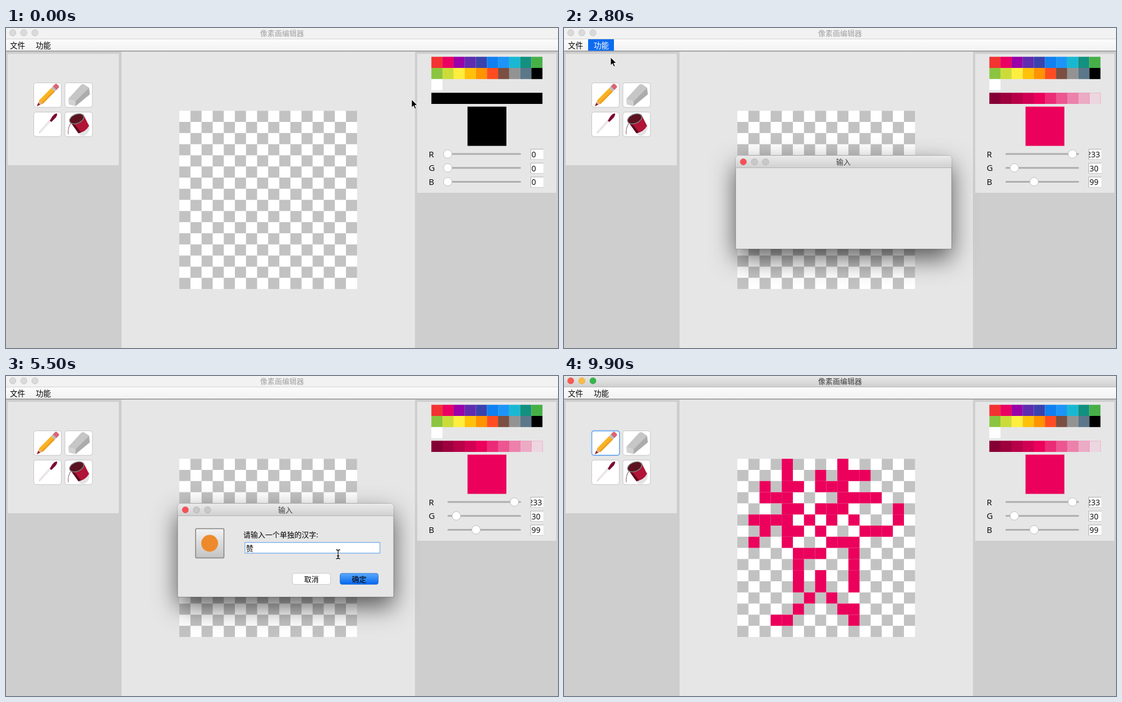
An HTML page with a canvas for the animation above (10 s loop, 984 px wide and 569 px high).

```html
<!DOCTYPE html>
<html lang="zh">
<head>
<meta charset="utf-8">
<style>
  html, body { margin: 0; width: 100%; height: 100%; overflow: hidden; background: #cecece; }
  canvas { display: block; }
</style>
</head>
<body>
<canvas id="stage" width="984" height="569"></canvas>
<script>
const ctx = document.getElementById('stage').getContext('2d');
const LOOP = 10000, STEP = 100, MOVE = 500;
const CJK = '"Noto Sans CJK SC", "Noto Sans CJK", sans-serif';
const LATIN = '"Open Sans", "Noto Sans", sans-serif';
const PANEL = '#e6e6e6', PINK = '#eb005c', CELL = 19.8;

// Moments at which the interface changes, in ms
const PICK = 700, MENU = 1800, DIALOG = 2700, CONTENT = 2900,
      TYPE = 4100, COMMIT = 4900, CLOSE = 6400;

// The pointer rests between moves; each stop is its arrival time and place
const start = { x: 723, y: 127 };
const stops = [
  { at: 600, x: 788, y: 60 },    // swatch
  { at: 1300, x: 254, y: 46 },
  { at: 1800, x: 66, y: 31 },    // menu
  { at: 2500, x: 83, y: 52 },    // menu item
  { at: 3300, x: 460, y: 250 },
  { at: 5400, x: 592, y: 317 },  // text field
  { at: 6000, x: 632, y: 361 },  // confirm
  { at: 8300, x: 745, y: -20 }   // off stage
];

const palette = (
  '#f33232 #eb0062 #9900a8 #5f2cb0 #3a42ad #1180f0 #1c95f7 #19b8d2 #13907f #46b047 ' +
  '#8bc540 #cbdc39 #ffee3d #ffc109 #ff9300 #ff4c21 #7b4f42 #939393 #5b7789 #000 #fff'
).split(' ');

// Pen strokes of the character on a 16 × 16 grid; a cell is set when a stroke crosses its centre
const strokes = new Path2D(
  'M4 0V7M2 2V3H4M4 2H5M4 4H5M1 5H4M1 7L3 5M9 0V4H7L5 6H4M6 5L7 6 9 4M7 1V2H9M9 1H11M9 3H12' +
  'M10 5L11 6H13L14 5V4M10 11V7H8L7 8H5V11M7 10V11L4 14H3M7 11L9 13H10V14');
const grid = Array.from({ length: 256 }, (_, i) => ({ col: i % 16, row: i >> 4 }));
ctx.lineWidth = 0.6;
ctx.lineCap = ctx.lineJoin = 'round';
const glyph = grid.filter(({ col, row }) => ctx.isPointInStroke(strokes, col, row));
ctx.lineCap = 'butt';

const ease = k => k * k * (3 - 2 * k);
const clamp = k => Math.min(1, Math.max(0, k));

function rect(x, y, w, h, fill) {
  ctx.fillStyle = fill;
  ctx.fillRect(x, y, w, h);
}

function paint(path, fill, stroke, width = 1) {
  if (fill) { ctx.fillStyle = fill; ctx.fill(path); }
  if (stroke) { ctx.strokeStyle = stroke; ctx.lineWidth = width; ctx.stroke(path); }
}

function shape(d, fill, stroke, width) {
  paint(new Path2D(d), fill, stroke, width);
}

function box(x, y, w, h, radius, fill, stroke, width) {
  const path = new Path2D();
  path.roundRect(x, y, w, h, radius);
  paint(path, fill, stroke, width);
}

function disc(x, y, r, fill, stroke) {
  box(x - r, y - r, 2 * r, 2 * r, r, fill, stroke);
}

function gradient(y, h, top, bottom) {
  const g = ctx.createLinearGradient(0, y, 0, y + h);
  g.addColorStop(0, top);
  g.addColorStop(1, bottom);
  return g;
}

function text(str, x, y, size, { color = '#000', align = 'left', family = CJK, weight = 400 } = {}) {
  ctx.font = `${weight} ${size}px ${family}`;
  ctx.textAlign = align;
  ctx.fillStyle = color;
  ctx.fillText(str, x, y);
}

function withShadow(color, blur, offset, draw) {
  ctx.save();
  ctx.shadowColor = color;
  ctx.shadowBlur = blur;
  ctx.shadowOffsetY = offset;
  draw();
  ctx.restore();
}

function cell(x, y, col, row, fill) {
  rect(x + col * CELL, y + row * CELL, CELL, CELL, fill);
}

function lights(x, y, colors) {
  colors.forEach((c, i) => disc(x + i * CELL, y, 5.7, c, 'rgba(0,0,0,.12)'));
}

function drawWindow(active, menuOpen) {
  rect(0, 0, 984, 569, '#cecece');
  rect(0, 0, 984, 19, active ? gradient(0, 19, '#e8e8e8', '#d0d0d0') : '#f2f2f2');
  rect(0, 19, 984, 1, active ? '#b3b3b3' : '#d4d4d4');
  lights(12, 8.5, active ? ['#fc5753', '#fdbc40', '#34b84a'] : Array(3).fill('#dadada'));
  text('像素画编辑器', 492, 13.5, 13, { color: active ? '#404040' : '#a2a2a2', align: 'center' });
  rect(0, 20, 984, 21, gradient(20, 21, '#fbfbfb', '#f2f2f2'));
  rect(0, 40.5, 984, 1, '#6c6c6c');
  if (menuOpen) rect(43, 20, 46, 20.5, '#0d6bef');
  text('文件', 7, 35.5, 13.5);
  text('功能', 53, 35.5, 13.5, { color: menuOpen ? '#fff' : '#000' });
  rect(3, 46, 198, 198, PANEL);
  rect(206, 42, 523, 527, PANEL);
  rect(733, 46, 248, 247, PANEL);
}

function drawPencil() {
  ctx.save();
  ctx.translate(55, 139);
  ctx.rotate(-0.79);
  shape('M0 0L11-4.5V4.5Z', '#e3b08c');
  shape('M0 0L6-2.5V2.5Z', '#8c2030');
  rect(10, -4.5, 31, 9, '#f8b323');
  rect(10, 2, 31, 2.5, '#ee9a1e');
  rect(41, -4.5, 4, 9, '#b9bcc0');
  box(45, -4.5, 8, 9, [0, 2, 2, 0], '#dc6472');
  ctx.restore();
}

function drawEraser() {
  shape('M111 126L133 102Q136 99 139 100L148 106 124 131Z', '#c6c6c6');
  shape('M148 106L149.5 118 124 139 123.5 131Z', '#acacac');
  shape('M111 126L124 131V139L112 136Z', '#d2d2d2');
}

function drawDropper() {
  shape('M59 187L60 184 78 163.5 80 165.5 62 185Z', '#f3eff1', '#cfc5c9', 0.8);
  shape('M78 165L82 158Q87 151 91 152 92 156 87 161L81 167Z', '#7d0a36');
}

function drawBucket() {
  shape('M128 186L148 170Q152 183 141 191 132 194 128 186Z', '#e3e3e6');
  shape('M114 166L138 154 148 174Q142 185 129 187Z', '#b01436');
  shape('M114 166L121 170 134 186 129 187Z', '#5a0a1a');
  shape('M114 167A13 8 -22 0 1 138 156A13 8 -22 0 1 114 167', '#5c121f', '#7b8481', 1.5);
  shape('M116 169Q110 176 111 189', null, '#9c7f88', 1.3);
}

function drawTools(focused) {
  for (let i = 0; i < 4; i++)
    box(49.5 + (i % 2) * 55.5, 97.5 + (i >> 1) * 52, 49, 43.5, 4, '#fff', '#c6c6c6');
  if (focused) box(49.5, 97.5, 49.5, 43.5, 4, null, '#75aef0', 1.8);
  drawPencil();
  drawEraser();
  drawDropper();
  drawBucket();
}

function drawSlider(label, value, y) {
  text(label, 753.5, y + 5.5, 15, { family: LATIN });
  box(787, y - 1.5, 131, 3, 1.5, '#adadad');
  disc(787.5 + value / 255 * 130, y, 7.6, '#fff', '#bdbdbd');
  rect(935, y - 9, 23, 19, '#b0b0b0');
  rect(936, y - 8, 22, 17.5, '#fff');
  ctx.save();
  ctx.beginPath();
  ctx.rect(936, y - 8, 22, 18);
  ctx.clip();
  // A number too wide for its field is scrolled to its end
  ctx.font = `14px ${LATIN}`;
  const x = Math.min(936.7, 955.5 - ctx.measureText(value).width);
  text(value, x, y + 6, 14, { family: LATIN });
  ctx.restore();
}

function drawColors(picked) {
  const base = picked ? PINK : '#000';
  palette.forEach((c, i) => cell(758.3, 51.2, i % 10, Math.floor(i / 10), c));
  rect(758.3, 115.2, 10 * CELL, CELL, base);
  for (let i = 0; picked && i < 10; i++) {
    const k = i - 4;
    ctx.globalAlpha = k < 0 ? -k * 0.11 : k * 0.18;
    cell(758.3, 115.2, i, 0, k < 0 ? '#000' : '#eee');
  }
  ctx.globalAlpha = 1;
  rect(822.7, 139.8, 69.3, 69.8, base);
  const rgb = picked ? [233, 30, 99] : [0, 0, 0];
  rgb.forEach((value, i) => drawSlider('RGB'[i], value, 224 + i * 24.7));
}

function drawCanvas(filled) {
  const x = 309, y = 147.2;
  rect(x, y, 16 * CELL, 16 * CELL, '#fff');
  for (const { col, row } of grid) if ((col + row) % 2) cell(x, y, col, row, '#c3c2c2');
  if (filled) for (const { col, row } of glyph) cell(x, y, col, row, PINK);
}

function drawMenu() {
  withShadow('rgba(0,0,0,.3)', 10, 4, () => box(43, 41, 104, 28, [0, 0, 5, 5], '#f6f6f6'));
  text('生成像素汉字', 54, 60, 13);
}

function drawCandidates() {
  withShadow('rgba(0,0,0,.5)', 9, 3, () => box(433.5, 320, 389, 26, 4, '#f8f8f8', '#c9c9c9'));
  box(437.5, 323.5, 31, 19.5, 3, '#e4ebf1', '#b9cbdc');
  [...'赞 咱攒暂簪錾糌拶'].forEach((char, i) => {
    const x = 442 + i * 38.6 + (i > 1 ? 6 : 0);
    text(i + 1, x, 337, 11, { color: '#777', align: 'center', family: LATIN });
    text(char, x + 15, 338.5, 16.5, { align: 'center', weight: 500 });
  });
  shape('M489 332H493Q497 328 497 322 501 321 501 329H506Q508 331 507 335L505 341H495L489 340Z',
    '#fdb924', '#e79a17');
  shape('M804.5 330.5L809 335 813.5 330.5', null, '#777', 1.3);
}

function drawButton(label, x, fill, border) {
  box(x, 351, 68, 19.5, 3.5, fill, border);
  text(label, x + 34, 365.5, 13, { align: 'center' });
}

function drawInput(t) {
  if (t >= COMMIT) return text('赞', 428, 310.5, 13);
  if (t < TYPE) return;
  const typed = 'zan'.slice(0, 1 + Math.floor((t - TYPE) / 200));
  text(typed, 428, 310.5, 13, { family: LATIN });
  const width = ctx.measureText(typed).width;
  rect(428, 312, width, 1, '#000');
  rect(428 + width, 298, 1, 15, '#000');
  drawCandidates();
}

function drawDialog(t) {
  const corners = [5, 5, 0, 0];
  withShadow('rgba(0,0,0,.62)', 43, 17, () => box(306, 227, 385, 166, corners, PANEL));
  box(306, 227, 385, 166, corners, PANEL, 'rgba(0,0,0,.28)');
  box(306, 227, 385, 21, corners, gradient(227, 21, '#eaeaea', '#d1d1d1'));
  rect(306, 248, 385, 1, '#b3b3b3');
  lights(319.7, 238, ['#fa4f56', '#c8c8c8', '#c8c8c8']);
  text('输入', 498, 243, 13, { color: '#404040', align: 'center' });
  if (t < CONTENT) return;

  box(338, 271.5, 50.5, 52, 2, gradient(271, 52, '#f3f3f3', '#c4c4c4'), '#808080', 1.5);
  disc(363, 297.5, 15, '#ee8a2c');
  text('请输入一个单独的汉字:', 423, 286.5, 13);
  box(426, 296, 240.5, 19, 0, '#fff', '#80b4ee', 1.4);
  drawButton('取消', 510.5, '#fff', '#c9c9c9');
  drawButton('确定', 595.5, gradient(351, 19, '#5aa9fb', '#0868ee'), '#2a78dc');
  drawInput(t);
}

function drawCursor(t) {
  let { x, y } = start;
  for (const stop of stops) {
    const k = ease(clamp((t - stop.at + MOVE) / MOVE));
    x += (stop.x - x) * k;
    y += (stop.y - y) * k;
  }
  ctx.save();
  ctx.translate(x, y);
  if (t >= 5300 && t < 5600) {
    const beam = 'M-3.5-8Q0-8 0-6V6Q0 8-3.5 8M3.5-8Q0-8 0-6M0 6Q0 8 3.5 8M-2 3H2';
    shape(beam, null, '#fff', 3);
    shape(beam, null, '#000', 1.3);
  } else {
    shape('M0 0V14.5L3.4 11.4 5.8 17 8.2 16 5.8 10.5H10.4Z', '#000', '#fff');
  }
  ctx.restore();
}

function draw(t) {
  const picked = t >= PICK;
  const dialog = t >= DIALOG && t < CLOSE;
  const active = picked && !dialog;
  drawWindow(active, t >= MENU && t < CONTENT);
  drawTools(active);
  drawColors(picked);
  drawCanvas(t >= CLOSE);
  if (t >= MENU && t < DIALOG) drawMenu();
  if (dialog) drawDialog(t);
  drawCursor(t);
}

function tick() {
  draw(Math.floor(performance.now() % LOOP / STEP) * STEP);
  requestAnimationFrame(tick);
}
tick();
</script>
</body>
</html>
```
